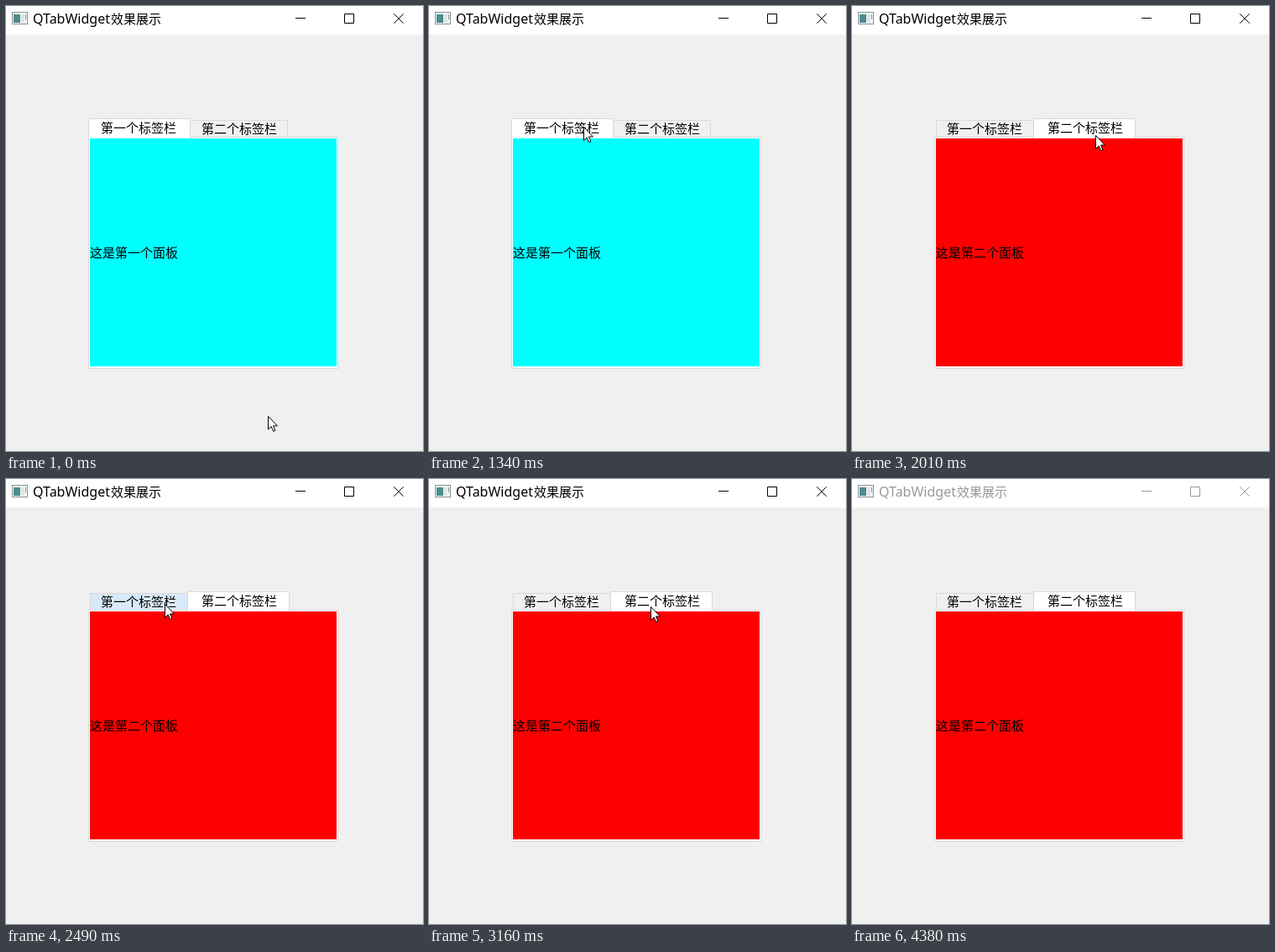
These frames come from a looping animation (497x531 px, 4420 ms). An HTML page:

```html
<!DOCTYPE html>
<html lang="zh-CN">
<head>
<meta charset="utf-8">
<title>QTabWidget效果展示</title>
<style>
  html, body { margin: 0; width: 100%; height: 100%; overflow: hidden; background: #f0f0f0; }
  svg { display: block; width: 497px; height: 531px; }
  text { font: 15px "Noto Sans CJK SC", "Noto Sans CJK", sans-serif; fill: #000; }
  #bar text { fill: inherit; }
  #bar .latin { font: 16px "Noto Sans", "Open Sans", sans-serif; }
  .edge { stroke: #d9d9d9; }
</style>
</head>
<body>
<svg viewBox="0 0 497 531">
  <rect width="497" height="531" fill="#f0f0f0"/>
  <rect width="497" height="34" fill="#fff"/>
  <g id="icon" shape-rendering="crispEdges">
    <rect x="7.5" y="7.5" width="18" height="14" fill="#f4f6f6" stroke="#8a9296"/>
    <rect x="9" y="10" width="8" height="10" fill="#4b8d8d"/>
    <rect x="18" y="10" width="4" height="10" fill="#dfe5e5"/>
    <rect x="23" y="10" width="1" height="6" fill="#7d9a9a"/>
  </g>
  <g id="bar">
    <text class="latin" x="32" y="21">QTabWidget</text>
    <text x="125" y="21">效果展示</text>
    <path d="M345 14.5H357M403.5 9.5H414.5V20.5H403.5ZM462.3 9.3L473.7 20.7M473.7 9.3L462.3 20.7" fill="none"/>
  </g>
  <rect class="edge" x="98.5" y="156.5" width="297" height="276" fill="#fff"/>
  <rect id="panel" x="100" y="158" width="294" height="272"/>
  <text id="label" x="100" y="300"></text>
  <path id="shape0" class="edge"/>
  <path id="shape1" class="edge"/>
  <text id="name0" x="113">第一个标签栏</text>
  <text id="name1" x="233">第二个标签栏</text>
  <path id="arrow" d="M.5 .5V16.3L4.2 12.9 6.6 18.5 8.9 17.5 6.5 12H11.4Z" fill="#fff" stroke="#000"/>
  <path id="beam" d="M0 .5H3M4 .5H7M3.5 1V15M0 15.5H3M4 15.5H7" fill="none" stroke="#000"/>
</svg>
<script>
const LOOP = 4420;
const $ = id => document.getElementById(id);
const set = (id, attrs) => {
  for (const k in attrs) $(id).setAttribute(k, attrs[k]);
};

const linear = u => u;
const easeOut = u => Math.sin(u * Math.PI / 2);
const easeBoth = u => (1 - Math.cos(u * Math.PI)) / 2;

// Cursor stops: time, x, y, kind
const stops = [];
const stop = (t, x, y, kind = 'arrow') => stops.push({ t, x, y, kind });

// Sampled quadratic path; a moving start skips the resting point.
function glide(t0, t1, n, [a, c, b], ease, resting = true) {
  for (let i = 0; i < n; i++) {
    const u = ease(resting ? (i + 1) / n : i / (n - 1));
    const at = k => Math.round((1 - u) ** 2 * a[k] + 2 * u * (1 - u) * c[k] + u * u * b[k]);
    stop(t0 + (t1 - t0) * i / (n - 1), at(0), at(1));
  }
}

stop(0, 312, 489);
stop(60, 0, 0, 'none');
glide(820, 1340, 10, [[294, 526], [235, 325], [184, 144]], easeOut, false);
glide(1660, 1880, 5, [[184, 144], [238, 148], [290, 154]], easeBoth);
glide(2150, 2490, 7, [[290, 154], [245, 160], [189, 149]], easeBoth);
glide(2750, 2980, 5, [[189, 149], [228, 152], [264, 152]], easeBoth);
glide(3340, 3723, 7, [[264, 152], [345, 300], [399, 487]], linear);
stop(3787, 350, 455);
stop(3850, 289, 412, 'beam');
stop(3920, 0, 0, 'none');

const clicks = [2010, 2630, 3160];

const tabs = [
  { on: [98.5, 219.5], off: [100.5, 216.5] },
  { on: [216.5, 337.5], off: [219.5, 335.5] }
];
const panels = [
  { fill: '#00ffff', text: '这是第一个面板' },
  { fill: '#ff0000', text: '这是第二个面板' }
];

function drawTab(i, active, cur) {
  const selected = i === active;
  const [l, r] = selected ? tabs[i].on : tabs[i].off;
  const hover = !selected && cur.kind === 'arrow' && cur.y < 157 && cur.x > l && cur.x < r;
  const top = selected ? 134.5 : 136.5;
  const foot = selected ? 157.5 : 156;
  set('shape' + i, {
    d: `M${l} ${foot}V${top}H${r}V${foot}`,
    fill: selected ? '#fff' : hover ? '#d8eaf9' : '#f0f0f0'
  });
  set('name' + i, { y: selected ? 151 : 152 });
}

function draw(t) {
  const cur = stops.findLast(s => s.t <= t);
  const active = clicks.filter(c => c <= t).length % 2;
  const ink = t < 4380 ? '#000' : '#999';
  set('bar', { fill: ink, stroke: 'none' });
  $('bar').querySelector('path').setAttribute('stroke', ink);
  set('panel', { fill: panels[active].fill });
  $('label').textContent = panels[active].text;
  tabs.forEach((_, i) => drawTab(i, active, cur));
  for (const kind of ['arrow', 'beam']) {
    set(kind, {
      transform: `translate(${cur.x} ${cur.y})`,
      visibility: cur.kind === kind ? 'visible' : 'hidden'
    });
  }
}

const start = performance.now();
function tick() {
  draw((performance.now() - start) % LOOP);
  requestAnimationFrame(tick);
}
tick();
</script>
</body>
</html>
```
